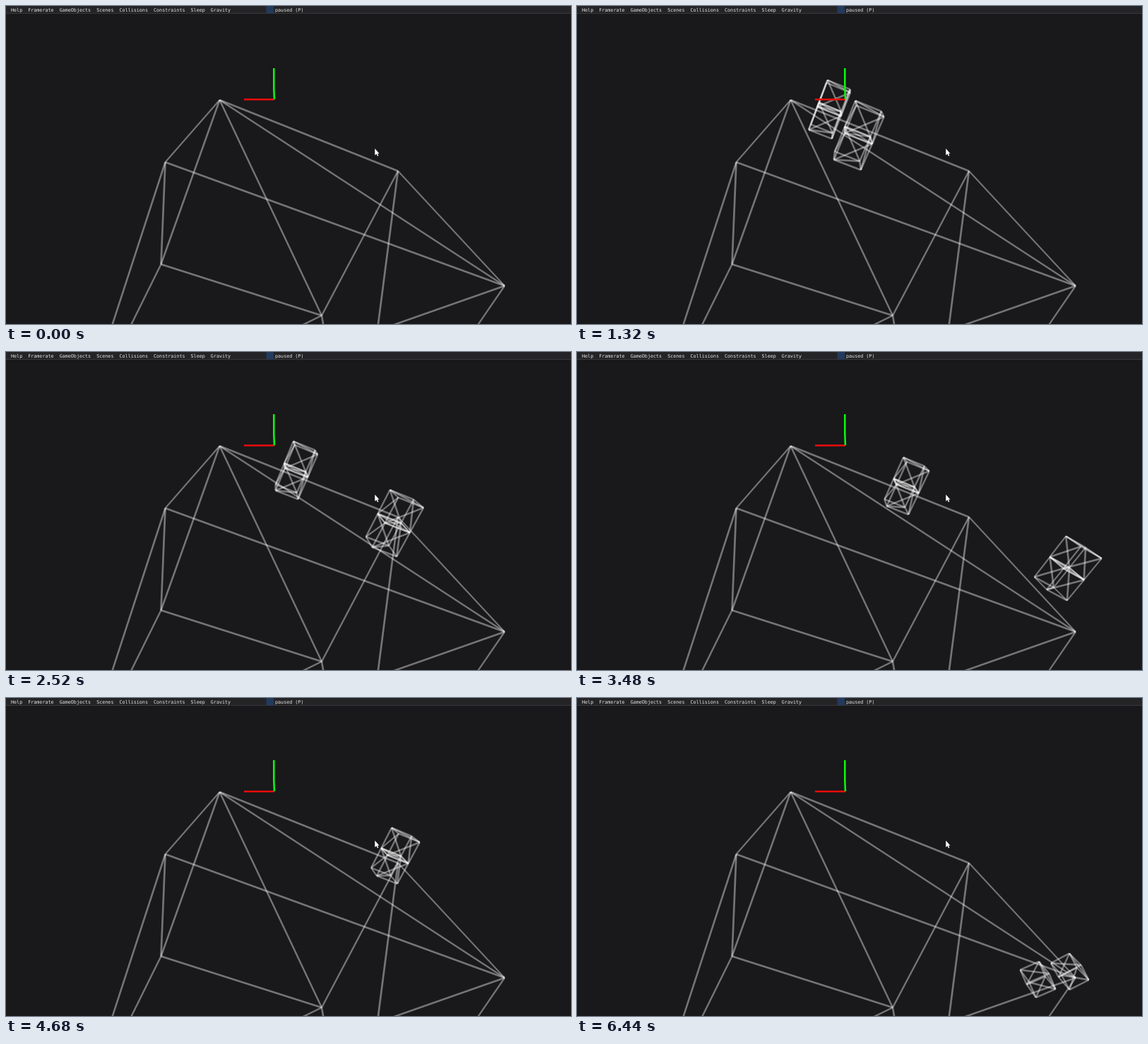
Recreate the animation shown at these times as an HTML page with a canvas. Size 800 by 450 pixels, loop 6.48 s.

```html
<!DOCTYPE html>
<html lang="en">
<head>
<meta charset="utf-8">
<title>Sliding stacks</title>
<style>
  html, body { margin: 0; width: 100%; height: 100%; overflow: hidden; background: #19181a; }
  canvas, svg { position: absolute; left: 0; top: 0; width: 100%; height: 100%; display: block; }
  text { font: 6.73px "DejaVu Sans Mono", "Liberation Mono", monospace; fill: #e6e6e6; white-space: pre; }
</style>
</head>
<body>
<canvas id="stage" width="800" height="450"></canvas>
<svg viewBox="0 0 800 450">
  <rect width="800" height="10.5" fill="#242426"/>
  <rect y="10" width="800" height="1" fill="#38383c"/>
  <rect x="368.5" width="10.5" height="10.3" fill="#223a5c"/>
  <g id="menu"></g>
  <path d="M380 132.3H337" stroke="#f00a0a" stroke-width="2.5"/>
  <path d="M379.3 88V117L380 132" fill="none" stroke="#0df312" stroke-width="2.6"/>
  <path d="M522.3 201.8V211.3L524.5 209.3L526 212.4L527.4 211.8L526 208.8H528.5Z" fill="#fff"/>
</svg>
<script>
const LOOP = 6480, STEP = 40;
const APPEAR = 160, LAND = 300;
const HALF = 0.0487;
const ctx = document.getElementById("stage").getContext("2d");

// Menu labels follow one another on a fixed character pitch.
const menu = document.getElementById("menu");
function label(str, x) {
  const el = document.createElementNS("http://www.w3.org/2000/svg", "text");
  el.setAttribute("x", x);
  el.setAttribute("y", 8);
  el.textContent = str;
  menu.append(el);
}
let menuX = 7;
for (const item of "Help Framerate GameObjects Scenes Collisions Constraints Sleep Gravity".split(" ")) {
  label(item, menuX);
  menuX += item.length * 4.05 + 8;
}
label("paused (P)", 381);

// Corner index bits: 1 = along the slope, 2 = towards the viewer, 4 = top.
const EDGES = [[4, 7], [1, 2], [4, 1], [7, 2], [6, 0], [5, 3]];
for (let i = 0; i < 8; i++)
  for (const bit of [1, 2, 4]) if (!(i & bit)) EDGES.push([i, i | bit]);

const RAMP = [
  [219.5, 365.5], [447, 438], [99, 609], [494, 705],
  [302.5, 133], [555, 233.5], [225.5, 221], [706, 396]
];

// u along the slope, v towards the viewer, w off the ramp's top face.
function project(u, v, w) {
  const z = 1 + 0.07942 * u - 0.49946 * v - 0.155 * w;
  return [
    (302.5 + 296.58 * u - 189.63 * v + 48.2 * w) / z,
    (133 + 119.04 * u - 22.38 * v - 288.9 * w) / z
  ];
}

function drawMesh(points) {
  for (const [i, j] of EDGES) {
    const [ax, ay] = points[i], [bx, by] = points[j];
    const dx = Math.abs(bx - ax), dy = Math.abs(by - ay);
    ctx.lineWidth = 2.7 * Math.max(dx, dy) / (Math.hypot(dx, dy) || 1);
    ctx.beginPath();
    ctx.moveTo(ax, ay);
    ctx.lineTo(bx, by);
    ctx.stroke();
  }
}

function drawCube(u, v, w, degrees, lift) {
  const c = Math.cos(degrees * Math.PI / 180), s = Math.sin(degrees * Math.PI / 180);
  const points = [];
  for (let i = 0; i < 8; i++) {
    const a = i & 1 ? HALF : -HALF, b = i & 2 ? HALF : -HALF, d = i & 4 ? HALF : -HALF;
    const [x, y] = project(u + a * c + d * s, v + b, w + d * c - a * s);
    points.push([x, y - lift]);
  }
  drawMesh(points);
}

// Each pair is [rate, acceleration] after the stack passes the ramp's edge.
const STACKS = [
  {
    v: 0.38, u: 0.184, speed: 1.067e-4, gain: 2.275e-8, tip: 5407,
    cubes: [
      { u: [2.74e-4, 1.245e-7], w: [0.55e-4, -4.05e-7], turn: [0.0519, -1.28e-5] },
      { u: [3.38e-4, 1.76e-7], w: [0.43e-4, -3.96e-7], turn: [0.054, -1.95e-5] }
    ]
  },
  {
    v: 0.637, u: 0.298, speed: 2.58e-4, gain: 0.7e-7, tip: 3141,
    cubes: [
      { u: [4.1e-4, 0.7e-7], w: [0.73e-4, -3.6e-7], turn: [0.01, 3e-5] },
      { u: [4.2e-4, 1.36e-7], w: [0.71e-4, -3.6e-7], turn: [0.01, 3e-5] }
    ]
  }
];

const travel = ([rate, accel], t) => rate * t + accel * t * t;

function drawStack(stack, t) {
  const lift = 0.3 * Math.max(0, LAND - t);
  const slide = Math.max(t, LAND) - 1320;
  const after = t - stack.tip;
  stack.cubes.forEach((cube, level) => {
    const w = HALF * (1 + 2 * level);
    if (after < 0) {
      drawCube(stack.u + travel([stack.speed, stack.gain], slide), stack.v, w, 0, lift);
    } else {
      drawCube(1 + travel(cube.u, after), stack.v, w + travel(cube.w, after), travel(cube.turn, after), 0);
    }
  });
}

function draw(t) {
  ctx.fillStyle = "#19181a";
  ctx.fillRect(0, 0, 800, 450);
  ctx.strokeStyle = "rgba(255, 255, 255, 0.4)";
  ctx.lineCap = "butt";
  drawMesh(RAMP);
  if (t >= APPEAR) for (const stack of STACKS) drawStack(stack, t);
}

const start = performance.now();
function tick() {
  const t = (performance.now() - start) % LOOP;
  draw(Math.floor(t / STEP) * STEP);
  requestAnimationFrame(tick);
}
tick();
</script>
</body>
</html>
```
